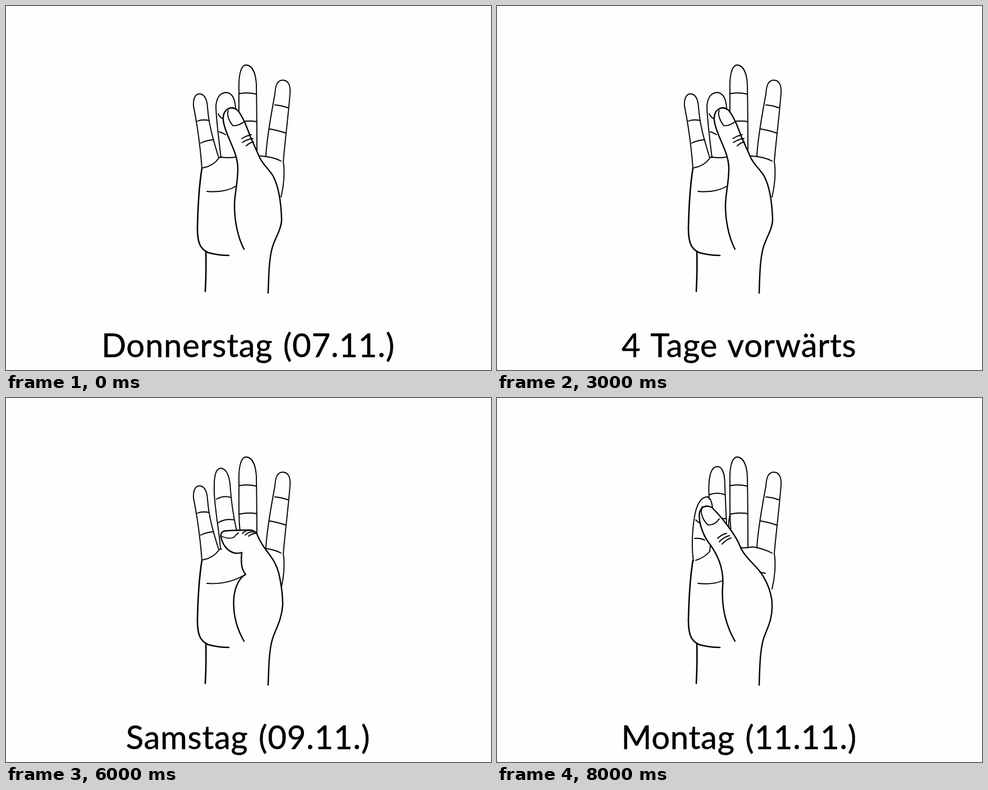
Animation, 864 px wide and 648 px high, one loop 9000 ms. Source, as an HTML page:

```html
<!DOCTYPE html>
<html lang="de">
<head>
<meta charset="utf-8">
<style>
  html, body { margin: 0; width: 100%; height: 100%; overflow: hidden; background: #fdfffc; }
  svg { display: block; width: 864px; height: 648px; }
  path { fill: none; stroke: #000; stroke-width: 1.9; stroke-linecap: round; stroke-linejoin: round; }
  #arm { stroke-width: 2.6; }
  #thumb { fill: #fdfffc; stroke-width: 2.4; }
  text {
    font: 58px Lato, Carlito, sans-serif; letter-spacing: .75px; word-spacing: 3px;
    text-anchor: middle; stroke: #000; stroke-width: .5px;
  }
</style>
</head>
<body>
<svg viewBox="0 0 864 648">
  <path id="fingers"/>
  <path id="thumb"/>
  <path id="arm" d="M349 289C344 320 342 350 341 395C341 420 345 432 360 439Q378 444 397 444M356 437Q357 470 355 508"/>
  <path id="details"/>
  <text id="label" x="431.3" y="625"></text>
</svg>
<script>
const pinky = `M349 289C347 262 342 218 334 178C333 164 338 156 345 156.5C354 157 358 166 359 180
  C361 208 367 232 379 270M341 205Q350 201 362 204M347 244Q357 239 370 238M351 288Q369 285 379 271Q381 268 384 269`;
const middle = `M417 237C414 215 415 180 415 150C414 125 418 105 428 105C440 106 445 122 446 140
  Q447 200 447 266M416 156Q431 153 446 157M415 207Q431 203 447 206`;
const index = `M463 267C464 245 470 205 479 157C480 140 484 132 493 132C503 132 507 142 506 155
  C503 195 497 240 494 277C497 295 495 320 490 340M479 176Q491 177 502 181M470 219Q483 221 498 226`;
const web = 'M452 267Q475 268 490 276';
const ringWeb = 'M383 269Q395 271 409 269';
const wrist = 'C491 396 480 412 475 428C468 450 468 485 467 511';

const poses = {
  thursday: {
    fingers: pinky + middle + index + web + ringWeb +
      `M383 270C380 245 374 200 374 177C376 160 384 154 393 154C403 155 408 165 409 182
      M378 192Q382 200 388 201M380 224Q384 225 391 229`,
    thumb: `M424 433C412 410 407 380 407 355C407 335 413 315 413 290C413 265 400 245 393 225
      C386 207 385 197 390 188Q400 176 412 185C421 195 428 212 435 232Q443 250 452 270
      C459 284 468 290 476 303C486 322 490 350 491 380` + wrist,
    details: `M396 186C393 192 396 203 404 213Q414 214 424 206M420 236Q428 231 437 229
      M421 243Q430 237 440 236M428 249Q434 243 441 242M358 330Q390 333 411 320`
  },
  friday: {
    fingers: pinky + middle + index + web + ringWeb +
      `M383 270C381 255 377 235 374 200C372 170 372 155 374 148C377 138 383 135 388 135
      C400 136 404 150 404 170Q403 188 406 202M375 182Q390 180 404 184M379 225L386 226`,
    thumb: `M424 433C408 395 405 360 407 340C409 320 415 300 414 280Q413 268 405 259
      C393 247 384 232 382 214C381 203 388 196 397 196Q402 196 406 200C420 212 436 226 443 245
      Q449 262 457 274C470 290 480 300 484 318C488 336 492 352 492 372` + wrist,
    details: `M390 199C387 208 392 219 400 225Q412 224 420 216M421 241Q429 234 438 232
      M425 246Q431 239 439 237M430 248Q434 243 440 243M358 330Q390 333 411 320`
  },
  saturday: {
    fingers: pinky + middle + index + web +
      `M382 267C380 240 373 205 371 170C370 140 373 125 383 125C394 126 399 142 400 165
      C402 190 406 215 411 237M375 180Q388 173 400 177M378 222Q390 214 407 217`,
    thumb: `M424 433C408 405 404 380 406 355C408 335 416 320 427 314C420 306 418 295 420 275
      Q416 277 407 276C395 273 386 262 383 248C381 238 388 236 398 236L430 235Q443 234 447 242
      C452 255 458 264 465 273C476 287 482 297 486 312C490 330 493 350 493 368` + wrist,
    details: `M383 246Q397 252 406 248Q409 244 414 240M421 241Q429 234 437 236M426 244Q435 236 442 239
      M432 246Q438 241 446 241M358 330Q395 333 427 314`
  },
  sunday: {
    fingers: pinky + index + web +
      `M383 268C381 235 374 200 370 160C370 137 375 125 384 125.5C395 127 400 150 400 175
      C404 205 410 240 414 266M375 179Q388 173 400 177M379 221Q390 214 405 217
      M380 270Q395 267 412 268Q416 262 428 266M411 187C412 162 420 154 430 154
      C444 156 451 172 453 190L454 208M416 166Q430 151 445 167M418 263Q417 245 419 226`,
    thumb: `M424 433C407 395 406 360 414 338Q420 322 427 314C428 290 428 265 427 245
      C424 235 413 215 413 195C413 183 420 177 430 177Q436 177 440 182C452 196 461 215 465 240
      C470 262 478 280 485 297C491 315 494 340 494 360` + wrist,
    details: `M420 180C418 188 424 200 431 206Q442 207 450 200M439 230Q448 230 458 225
      M441 237Q450 233 461 230M446 241Q454 237 463 236M358 330Q395 333 427 314M428 306L430 322`
  },
  monday: {
    fingers: middle + index +
      `M378 180C376 150 378 122 393 122C404 123 406 140 406 158L409 228M379 172Q392 167 406 172
      M397 214L409 215M415 207Q412 220 413 233M430 266Q443 268 455 265Q475 268 490 276
      M350 290C346 265 348 230 353 205C357 188 364 176 375 176Q382 178 384 196
      M354 217L360 222M352 250Q362 249 370 253M354 289Q370 284 379 273L380 263`,
    thumb: `M424 433C405 400 400 365 402 335C405 300 390 275 379 260C367 245 358 220 361 203
      C364 193 374 190 383 195C400 212 425 243 433 264C440 282 458 295 470 311
      C482 328 490 350 490 368` + wrist,
    details: `M366 193C361 203 366 217 376 226Q388 227 396 215M393 250Q400 243 409 241
      M396 256Q403 248 414 245M401 260Q408 252 417 249M358 330Q385 333 402 325M468 310L478 312`
  }
};

const thursday = ['thursday', 'Donnerstag (07.11.)'];
const forward = ['thursday', '4 Tage vorwärts'];
const steps = [
  thursday, thursday, forward, forward, thursday,
  ['friday', 'Freitag (08.11.)'],
  ['saturday', 'Samstag (09.11.)'],
  ['sunday', 'Sonntag (10.11.)'],
  ['monday', 'Montag (11.11.)']
];

const el = id => document.getElementById(id);
const start = performance.now();
let shown;

function draw() {
  const step = steps[Math.floor((performance.now() - start) / 1000) % steps.length];
  if (step !== shown) {
    shown = step;
    const [pose, text] = step;
    for (const part in poses[pose]) el(part).setAttribute('d', poses[pose][part]);
    el('label').textContent = text;
  }
  requestAnimationFrame(draw);
}
draw();
</script>
</body>
</html>
```
